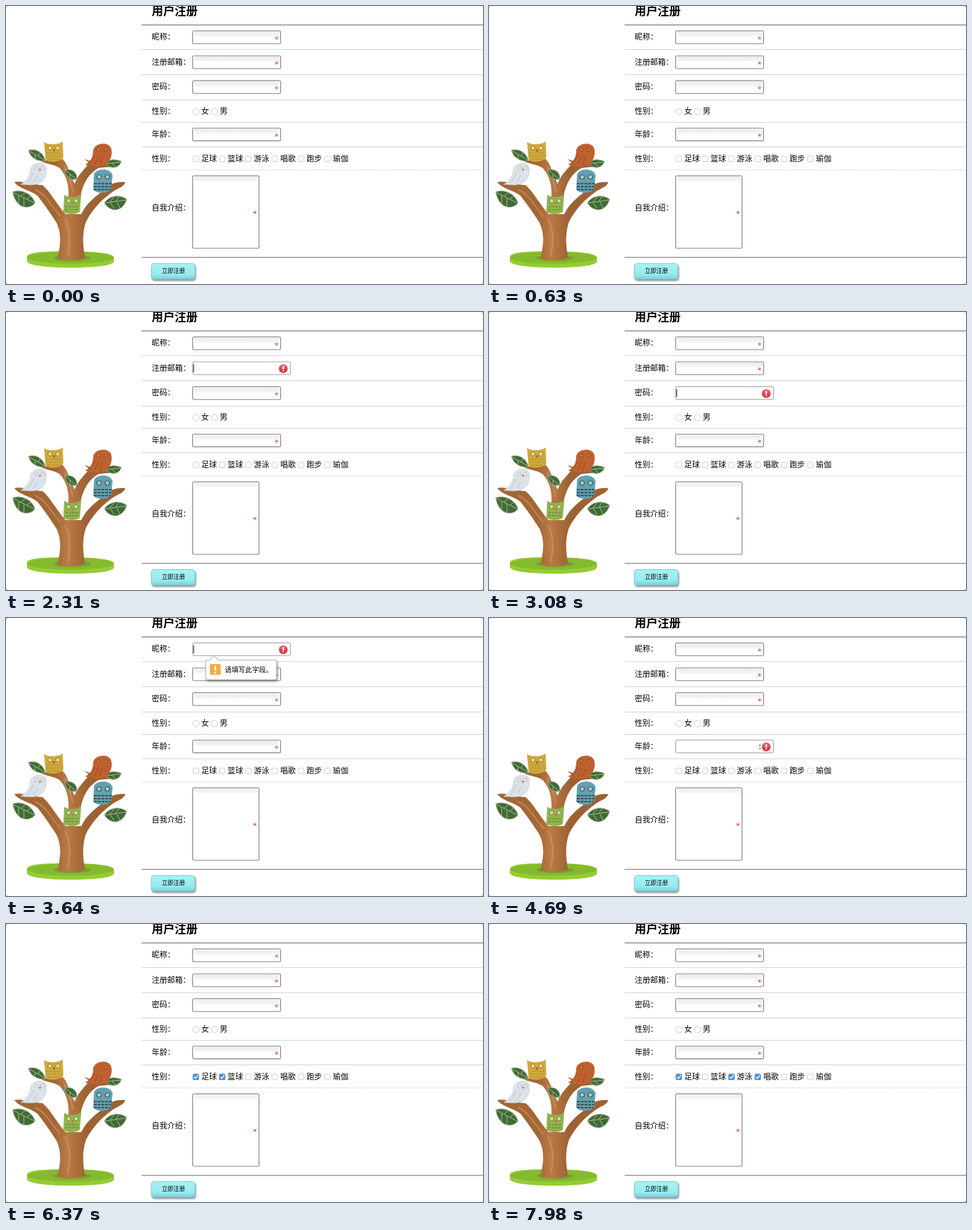
Write an HTML page that moves like this. It is 640 px wide and 374 px high and loops after 8000 ms.

```html
<!DOCTYPE html>
<html lang="zh-CN">
<head>
<meta charset="utf-8">
<title>用户注册</title>
<style>
html, body { margin: 0; width: 100%; height: 100%; overflow: hidden; background: #c9c9c9; }
svg { display: block; width: 640px; height: 374px; }
text { font: 10.4px "Noto Sans CJK SC", "Noto Sans CJK", "Noto Sans", sans-serif; fill: #000; }
.title { font-size: 15.4px; font-weight: 700; }
.go { font-size: 7.8px; font-weight: 500; }
.tip { font-size: 9.2px; }
.frame { fill: #fff; stroke: #8a8a8a; stroke-width: 1.1; }
.focused .frame { stroke: #a6a6a6; stroke-width: 1; }
.star { stroke: #d4566a; stroke-width: .95; }
.tick { fill: none; stroke: #fff; stroke-width: 1.3; }
.leaf { fill: #416a35; stroke: #a9bb9c; stroke-width: .8; }
.vein { fill: none; stroke: #b6c9a5; stroke-width: .8; }
.dark { fill: none; stroke: #33444a; stroke-width: 1.4; }
</style>
</head>
<body>
<svg viewBox="0 0 640 374">
  <defs>
    <linearGradient id="bark" gradientUnits="userSpaceOnUse" x1="66" x2="108" y1="0" y2="0">
      <stop offset="0" stop-color="#a26735"/><stop offset=".4" stop-color="#bb7a46"/><stop offset="1" stop-color="#9c6234"/>
    </linearGradient>
    <linearGradient id="aqua" x2="0" y2="1">
      <stop offset="0" stop-color="#a6f2f4"/><stop offset=".7" stop-color="#98eaee"/><stop offset="1" stop-color="#77cfd8"/>
    </linearGradient>
    <linearGradient id="shade" x2="0" y2="1">
      <stop offset="0" stop-color="#ececec"/><stop offset="1" stop-color="#f5f5f5"/>
    </linearGradient>
    <radialGradient id="red" cy=".3"><stop offset="0" stop-color="#f0868a"/><stop offset="1" stop-color="#d4303c"/></radialGradient>
    <filter id="soft" x="-20%" y="-30%" width="150%" height="180%">
      <feDropShadow dx="1" dy="2" stdDeviation="1.2" flood-color="#555" flood-opacity=".65"/>
    </filter>
    <g id="star" class="star"><path d="M0 0V-2.5M0 0L2.400-.800M0 0L1.500 2M0 0L-1.500 2M0 0L-2.400-.800"/></g>
    <g id="alert">
      <circle r="6" fill="url(#red)" stroke="#e2c4c5" stroke-width=".700"/>
      <path d="M0-3.400V.800" stroke="#fff" stroke-width="1.600"/><circle cy="2.800" r=".900" fill="#fff"/>
    </g>
  </defs>

  <rect width="640" height="374" rx="4" fill="#fff"/>

  <g id="tree">
    <path d="M28 338C28 330 55 330 86 330S145 332 145 339V343C145 350 116 352 86 352S28 349 28 343Z" fill="#93cd33"/>
    <ellipse cx="86.500" cy="338.500" rx="58" ry="8" fill="#85b92e"/>
    <ellipse cx="89" cy="339" rx="25" ry="4" fill="#74a12b"/>
    <g fill="url(#bark)">
      <path d="M11 237C20 234 38 241 49 241C59 249 68 267 80 280H101C106 269 115 260 127 251C138 240 146 236 160 237C159 243 150 245 143 250C129 260 116 273 107 291C102 307 103 322 106 338C98 343 76 343 69 339C74 319 74 305 68 292C60 279 50 265 42 255C31 247 18 246 11 237Z"/>
      <path d="M83 262C86 243 81 228 72 218C63 212 52 213 44 207C54 207 65 210 75 205C83 211 85 226 92 239C97 226 106 219 112 211L105 206C114 208 122 214 134 212L154 213C146 218 135 216 124 218C110 226 102 240 99 262Z"/>
    </g>
    <path d="M83 336C88 311 84 295 79 286M39 247C54 253 62 271 73 283M78 216C86 224 87 240 90 249" fill="none" stroke="#d4a273" stroke-width="2" opacity=".5"/>

    <path class="leaf" d="M9 250C20 246 35 252 39 265C31 275 13 273 9 250Z"/>
    <path class="vein" d="M10 251L38 265M17 255L17 266M24 258V270M20 256L27 250M28 260L34 255"/>
    <path class="leaf" d="M162 260C151 252 137 256 132 265C139 277 156 279 162 260Z"/>
    <path class="vein" d="M133 265L161 261M139 264L145 257M147 263L152 256M140 265L145 272M149 264L153 272"/>
    <path class="leaf" d="M30 194C40 191 50 197 53 208C43 210 33 205 30 194Z"/>
    <path class="vein" d="M31 195L52 207M39 200V206M43 202L46 197"/>
    <path class="leaf" d="M134 212C138 205 148 206 155 209C151 219 141 220 134 212Z"/>
    <path class="vein" d="M135 212L154 210M142 211L147 217"/>
    <path class="leaf" d="M79 220C88 219 96 223 95 233C87 235 79 230 79 220Z"/>
    <path class="vein" d="M80 221L94 233M86 226V231"/>

    <g id="yellow">
      <path d="M51 183C56 187 71 187 76 182L77 203C75 210 57 212 53 206Z" fill="#cfa93b"/>
      <path d="M54 198H75M55 202H75M56 206H73" stroke="#ac8533" stroke-dasharray="2 1.500"/>
      <g fill="#ecd88d" stroke="#94702d" stroke-width=".800"><circle cx="59" cy="191" r="2.800"/><circle cx="69.500" cy="191" r="2.800"/></g>
      <path d="M63 193H66L64.500 197Z" fill="#b64924"/>
    </g>
    <g id="orange">
      <path d="M117 194C119 184 137 182 141 191C144 201 139 212 130 215C122 217 112 216 106 213C114 210 117 203 117 194Z" fill="#bf602f"/>
      <path d="M119 201L111 213M124 202L119 213M129 203L126 213" stroke="#984a29" stroke-width="1.300" stroke-dasharray="2 1"/>
      <circle cx="124" cy="193" r="2.300" fill="#d17a3e" stroke="#944b27"/><circle cx="134" cy="193" r="2.300" fill="#d17a3e" stroke="#944b27"/>
    </g>
    <g id="white">
      <path d="M33 219C36 210 51 209 54 217C55 228 51 236 43 239C36 242 28 240 20 240C28 235 33 228 33 219Z" fill="#dce3e8" stroke="#c5ced4" stroke-width=".800"/>
      <path d="M37 224C33 231 32 235 28 238M43 228L37 237" fill="none" stroke="#b8c3cb"/>
      <g fill="#eef1f3" stroke="#a8b4bc" stroke-width=".800"><circle cx="41" cy="218" r="2.300"/><circle cx="49" cy="218" r="2.300"/></g>
      <path d="M44 219H47L45.500 223Z" fill="#db7959"/>
    </g>
    <g id="blue">
      <path d="M118 228C118 218 141 217 143 228L141 246C137 253 122 253 117 247Z" fill="#62a1b1"/>
      <path class="dark" d="M118 239H142M118 243H141M118 247H140" stroke-dasharray="4 1"/>
      <g fill="#a1cbd2" stroke="#3e626d" stroke-width="1.200"><circle cx="125" cy="230" r="3"/><circle cx="136" cy="230" r="3"/></g>
      <path d="M129 231H132L130.500 235Z" fill="#d58938"/>
    </g>
    <g id="green">
      <path d="M78 254C84 258 95 258 101 253L99 277C94 281 82 281 77 277Z" fill="#92b24c"/>
      <path d="M80 270H98M80 274H98" stroke="#6e8d3d" stroke-width="1.300" stroke-dasharray="3 1.500"/>
      <g fill="#cedc9d" stroke="#698545" stroke-width=".800"><circle cx="84" cy="262" r="2.800"/><circle cx="94" cy="262" r="2.800"/></g>
      <path d="M87.500 264H91L89 268Z" fill="#cf7036"/>
    </g>
  </g>

  <text class="title" x="195.500" y="12">用户注册</text>
  <path d="M182 58.500H640M182 92.500H640M182 126.500H640M182 156.500H640M182 189.500H640" stroke="#d9d9d9"/>
  <path d="M182 220.500H640" stroke="#cbcbcb" stroke-dasharray="1 1"/>
  <path d="M182 25.500H640M182 338.200H640" stroke="#757575"/>

  <g id="form"></g>

  <g filter="url(#soft)">
    <rect x="195" y="346.500" width="58.500" height="21" rx="3.500" fill="url(#aqua)" stroke="#78c5cd" stroke-width=".800"/>
  </g>
  <text class="go" x="209" y="359.300">立即注册</text>

  <g id="tooltip">
    <path filter="url(#soft)" d="M270 56.500H273.500L279 51L284.500 56.500H361Q363 56.500 363 58.500V81Q363 83 361 83H270Q268 83 268 81V58.500Q268 56.500 270 56.500Z" fill="#fff" stroke="#a8a8a8" stroke-width=".800"/>
    <rect x="273.500" y="62" width="14.500" height="14.500" rx="1.500" fill="#f0ad45"/>
    <path d="M280.750 64.500V71" stroke="#fff" stroke-width="2"/><circle cx="280.750" cy="73.700" r="1.200" fill="#fff"/>
    <text class="tip" x="293.500" y="73">请填写此字段。</text>
  </g>
</svg>

<script>
const LOOP = 8000, GROW = 250;
const form = document.getElementById('form');
const tooltip = document.getElementById('tooltip');
const show = (node, on) => node.setAttribute('visibility', on ? 'visible' : 'hidden');

function add(markup) {
  const group = document.createElementNS('http://www.w3.org/2000/svg', 'g');
  group.innerHTML = markup;
  return form.appendChild(group);
}
const label = (text, x, y) => add(`<text x="${x}" y="${y}">${text}</text>`);

// Focus spans are [start, end] in milliseconds.
function makeField(y, spans, spinner) {
  const group = add(`
    <rect class="frame" x="250.500" y="${y}" width="118" height="17.200" rx="1.500"/>
    <g class="idle"><rect x="253" y="${y + 1}" width="113" height="6.500" fill="url(#shade)"/>
      <use href="#star" x="363" y="${y + 9.8}"/></g>
    <g class="active"><use href="#alert"/>
      ${spinner
        ? `<path d="M362 ${y + 7.5}l1.500-2l1.500 2zm0 3l1.500 2l1.500-2z" fill="#555"/>`
        : `<path d="M251.800 ${y + 3.5}v10.500" stroke="#222"/>`}</g>`);
  const find = selector => group.querySelector(selector);
  return { group, y, spans, box: find('rect'), idle: find('.idle'), active: find('.active'), alert: find('.active use') };
}

[['昵称：', 45.4], ['注册邮箱：', 78.9], ['密码：', 112.4], ['性别：', 145.2],
 ['年龄：', 176.2], ['性别：', 209.2], ['自我介绍：', 275]].forEach(([text, y]) => label(text, 195.5, y));

const fields = [
  makeField(33.5, [[1190, 1900], [3400, 4340]]),
  makeField(67, [[1900, 2750]]),
  makeField(100.5, [[2750, 3400]]),
  makeField(164.2, [[4340, 5400]], true)
];

[['女', 255], ['男', 279.7]].forEach(([text, x]) => {
  add(`<circle cx="${x}" cy="142" r="4.300" fill="#fff" stroke="#c6c6c6" stroke-width=".800"/>`);
  label(text, x + 7, 145.2);
});

// Each option lists the times at which it is toggled.
const options = [['足球', [5880]], ['篮球', [6230, 7000]], ['游泳', [7280]],
  ['唱歌', [7560]], ['跑步', []], ['瑜伽', []]].map(([text, clicks], i) => {
  const x = 251 + i * 35.3;
  add(`<rect x="${x}" y="202" width="7.500" height="7.500" rx="1.500" fill="#fff" stroke="#c6c6c6" stroke-width=".800"/>`);
  label(text, x + 11, 209.2);
  const mark = add(`<rect x="${x - .4}" y="201.600" width="8.300" height="8.300" rx="1.500" fill="#4b91dc"/>
    <path class="tick" d="M${x + 1.5} 206l1.800 1.800l3.200-4.500"/>`);
  return { clicks, mark };
});

add(`<rect class="frame" x="250.500" y="228.500" width="89" height="97.500" rx="1.500"/>
  <rect x="253" y="229.500" width="84" height="6" fill="url(#shade)"/>
  <use href="#star" x="334" y="277.800"/>`);

const ease = p => { p = Math.min(1, Math.max(0, p)); return 1 - (1 - p) ** 3; };

function draw(now) {
  const t = now % LOOP;
  for (const field of fields) {
    let growth = 0, focused = false;
    for (const [start, end] of field.spans) {
      if (t < start) continue;
      focused = t < end;
      growth = focused ? ease((t - start) / GROW) : 1 - ease((t - end) / GROW);
    }
    const width = 118 + 13 * growth;
    field.box.setAttribute('width', width);
    field.alert.setAttribute('transform', `translate(${241 + width} ${field.y + 9.2})`);
    field.group.classList.toggle('focused', focused);
    show(field.idle, !focused);
    show(field.active, focused);
  }
  for (const { clicks, mark } of options) show(mark, clicks.filter(c => t >= c).length % 2);
  show(tooltip, t >= 3430 && t < 4340);
}

function tick() {
  draw(performance.now());
  requestAnimationFrame(tick);
}
draw(0);
requestAnimationFrame(tick);
</script>
</body>
</html>
```
